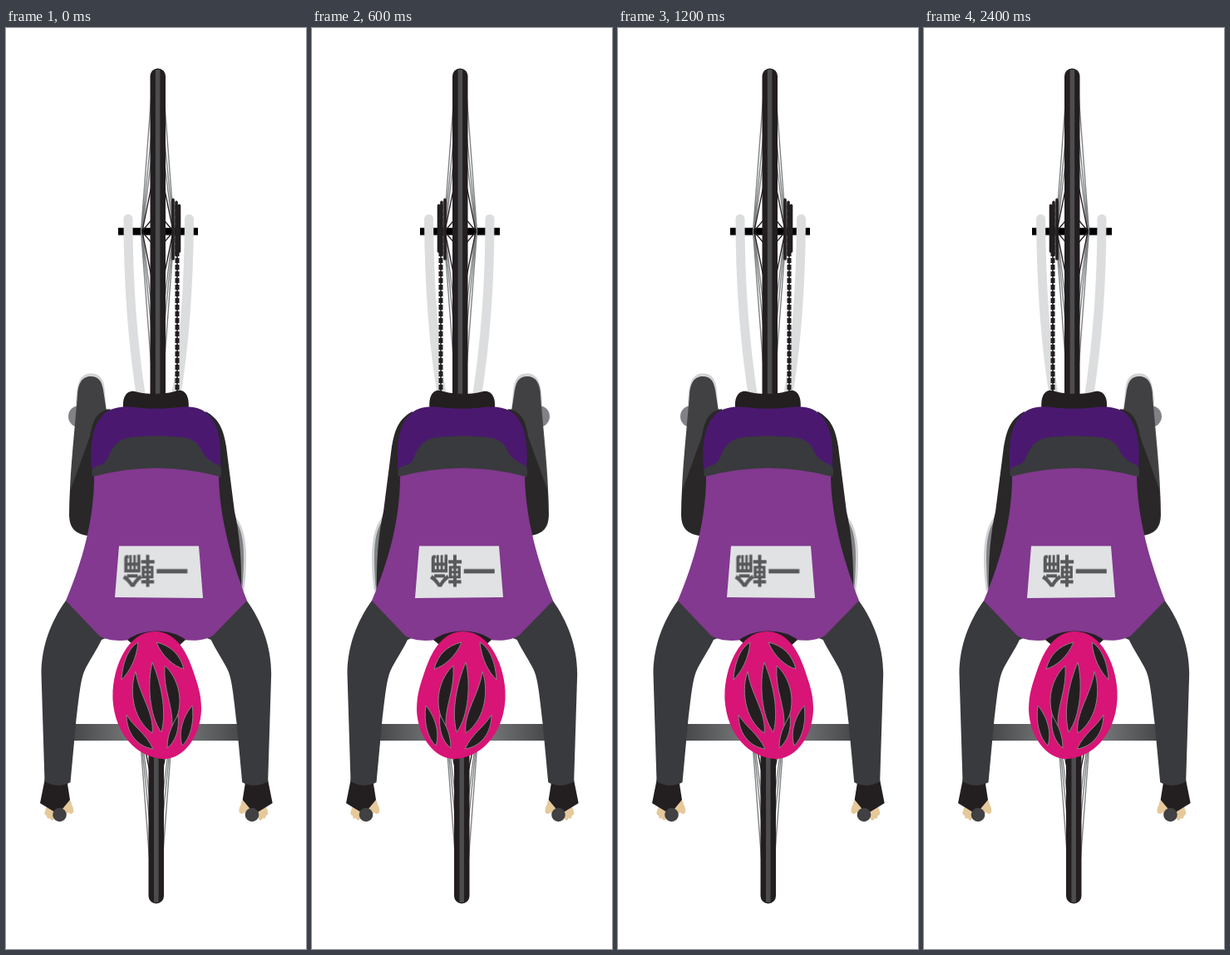
Write an HTML page that moves like this. It is 361 px wide and 1105 px high and loops after 2600 ms.

```html
<!DOCTYPE html>
<html lang="ja">
<head>
<meta charset="utf-8">
<title>一輪</title>
<style>
html, body { margin: 0; width: 100%; height: 100%; overflow: hidden; background: #fff; }
svg { display: block; width: 361px; height: 1105px; }
.flip, .turn { transform-box: view-box; animation: flip 2600ms step-end infinite; }
.flip { transform-origin: 180.5px 0; }
/* keeps the lettering readable inside the flipped bib */
.turn { transform-origin: 179.8px 0; }
@keyframes flip {
  0%, 15.3846%, 30.7692%, 46.1538%, 84.6154% { transform: none; }
  7.6923%, 23.0769%, 38.4615%, 65.3846%, 92.3077% { transform: scaleX(-1); }
  100% { transform: scaleX(-1); }
}
text { font: 700 40px "Noto Sans CJK JP", "Noto Sans CJK", sans-serif; fill: #58595b; }
.ink { fill: #231f20; }
.thigh { fill: #292728; }
.sleeve { fill: #393a3d; }
.line { fill: none; stroke: #231f20; }
.wire { fill: none; stroke: #808285; stroke-width: 1.4; }
.stay { fill: none; stroke: #dcddde; stroke-width: 11; stroke-linecap: round; }
</style>
</head>
<body>
<svg viewBox="0 0 361 1105">
  <defs>
    <linearGradient id="bar">
      <stop offset="0" stop-color="#464749"/>
      <stop offset=".5" stop-color="#8a8c8e"/>
      <stop offset="1" stop-color="#464749"/>
    </linearGradient>
    <!-- one quarter of the spokes, hub at the origin, rim upwards -->
    <g id="fan">
      <path class="wire" d="M-20 0L-8-158M-19-3L-8-112M-18-4L-8-84"/>
      <path class="line" stroke-width="1.3" d="M-18-3L-8-52M-19 0L-8-13"/>
    </g>
    <g id="spokes">
      <use href="#fan"/>
      <use href="#fan" transform="scale(-1 1)"/>
    </g>
    <g id="arm">
      <path fill="#e6c99b" d="M50 931L62 940L57 950Q54 952 53 948Q49 950 49 945Q45 944 47 939ZM66 938L75 925Q79 927 79 932Q82 936 81 941Q78 945 75 941L71 944Z"/>
      <path class="ink" d="M47 900H75L74 907L77 926L67 938L64 944L41 930Z"/>
      <path class="sleeve" d="M72 687L90 690L120 732L115 734C110 745 99 761 95 770C90 780 88 800 84 835L77.5 905Q62 913 46.5 904L42.5 775C42.5 742 54 712 72 687Z"/>
    </g>
  </defs>

  <g class="flip">
    <rect x="135" y="239.7" width="96" height="8.8"/>
    <use href="#spokes" x="182.5" y="244"/>
    <use href="#spokes" transform="translate(182.5 244) scale(1 -1)"/>
    <rect class="ink" x="173.5" y="48.5" width="18.5" height="408" rx="9"/>
    <path class="line" style="stroke:#4d4d4f" stroke-width="5.5" d="M182.6 50V450"/>
    <path class="stay" d="M147 229C147 300 151 370 163 445M220.5 229C220 300 216 375 204 445"/>
    <path class="line" stroke-width="3.6" stroke-linecap="round" d="M201 206V277M205 209V272M208.5 213V268"/>
    <path class="line" stroke-width="5" stroke-dasharray="6 2" d="M206 212V438"/>
    <path class="line" stroke-width="1.6" d="M206 270V438"/>

    <circle cx="88" cy="466" r="13" fill="#808285"/>
    <circle cx="116" cy="464" r="9" fill="#6d6e71"/>
    <path fill="#d1d3d4" d="M84 450C85 424 90 414.5 102 414.5C113 414.5 118 421 119 436L121 460L90 470Z"/>
    <path fill="#414042" d="M86 440C87 424 93 418 102 418C111 418 115 423 117 434L124 480L104 545L76.5 580C76 540 83 480 86 440Z"/>
    <path class="thigh" d="M125 457C108 460 104 473 101 490L77 556L76 583C76 603 86 608 104 610L115 540Z"/>
    <path fill="#d1d3d4" d="M272 584C284 590 289 612 289 635C289 652 288 664 286 676L270 660Z"/>
    <path fill="#808285" d="M273 587C283 598 286 614 286 635C286 652 285 665 284 675L270 660Z"/>
    <path class="thigh" d="M240 460C256 468 262 482 265 502L275 580C281 606 284 640 283 676L264 640L250 530Z"/>
    <path class="ink" d="M142 462C138 442 146 434 155 436C168 440 192 440 206 435C217 433 222 444 219 462Z"/>
    <path fill="#4a196f" d="M103 530C99 482 112 460 132 456C150 452 162 458 180 456.500C200 458 212 452 230 456C249 461 259 484 258 512V530Z"/>
    <use href="#spokes" transform="translate(180.5 838) scale(1 -1)"/>
    <rect class="ink" x="171.5" y="840" width="18.5" height="210.5" rx="9"/>
    <path class="line" style="stroke:#4d4d4f" stroke-width="5.5" d="M180.8 845V1049"/>
  </g>

  <rect x="80" y="835" width="203" height="20" fill="url(#bar)"/>
  <path class="sleeve" d="M104 538C102 530 104 527 112 525C122 522 122 516 126 508C132 497 140 492 152 491C172 489 190 489 210 491C222 492 230 496 235 506C239 516 246 520 255 524C260 527 260 533 258 539Z"/>
  <use href="#arm"/>
  <use href="#arm" transform="matrix(-1 0 0 1 361.7 0)"/>
  <path fill="#82398f" d="M106 538Q181 518 256 538C257 590 272 640 290 687L249 729C237 736 225 735 212 734H149C135 736 122 735 112 729L72 687C92 640 106 590 106 538Z"/>
  <path class="ink" d="M146 734C165 720 198 720 216 734L205 744H158Z"/>

  <g class="flip">
    <circle cx="64.5" cy="944" r="8.3" fill="#414042"/>
    <circle cx="296" cy="944" r="8.3" fill="#414042"/>
    <path fill="#e1e2e4" d="M136 621.5H232L237 684L131 683Z"/>
    <g class="turn">
      <text x="139.8" y="666.4" transform="rotate(180 179.8 651.2)">一輪</text>
    </g>
    <path fill="#d81476" d="M178 724C202 723 216 745 224 768C231 789 235 798 235 818C234 850 214 877 190 877C158 876 131 847 128.500 806C127 768 146 725 178 724Z"/>
    <g class="ink" stroke="#8a7f84" stroke-width="1">
      <path d="M159 737C147 744 140 762 139 782C149 772 157 757 159 737Z"/>
      <path d="M181 737C199 741 210 753 214 769C202 766 188 754 181 737Z"/>
      <path d="M156 772C149 790 150 828 176 846C179 822 160 800 156 772Z"/>
      <path d="M176 761C170 785 172 825 187 845C194 818 186 785 176 761Z"/>
      <path d="M191 765C206 778 218 810 200 838C201 812 189 795 191 765Z"/>
      <path d="M145 824C145 845 157 862 177 865C168 846 155 840 145 824Z"/>
      <path d="M207 824C199 838 194 848 194 864C204 856 209 842 207 824Z"/>
      <path d="M224 813C213 826 207 845 212 861C222 852 227 832 224 813Z"/>
    </g>
  </g>
</svg>
</body>
</html>
```
